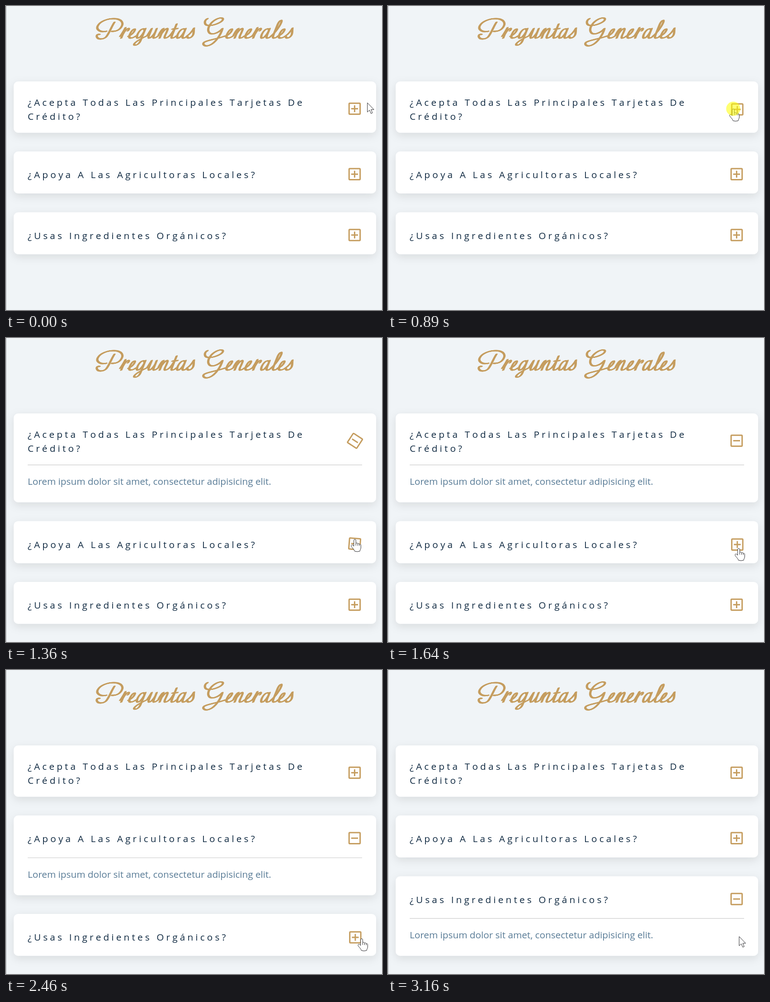
Animation of 832x673 px, one loop 3.35 s. Source, as an HTML page:

```html
<!DOCTYPE html>
<html lang="es">
<head>
<meta charset="utf-8">
<title>Preguntas Generales</title>
<style>
  html, body { margin: 0; width: 100%; height: 100%; overflow: hidden; background: #f0f4f7; }
  svg { display: block; width: 832px; height: 673px; }
  text { font-family: "Open Sans", "Noto Sans", sans-serif; font-size: 20.73px; }
  .ask { fill: #102a42; letter-spacing: 5.17px; font-kerning: none; }
  .answer { fill: #587b96; }
  .rule { stroke: #d3d3d3; stroke-width: 1.4; }
  .icon { fill: none; stroke: #c59d5f; stroke-width: 3; }
  .script { fill: none; stroke: #c59d5f; stroke-width: 2.4; stroke-linecap: round; stroke-linejoin: round; }
  .cursor { fill: #fff; stroke: #2a2a2e; stroke-width: 1; stroke-linejoin: round; }
</style>
</head>
<body>
<svg viewBox="0 0 832 673">
  <defs>
    <filter id="shade" filterUnits="userSpaceOnUse" x="-40" y="-40" width="920" height="320">
      <feDropShadow dx="0" dy="6" stdDeviation="9.5" flood-color="#000" flood-opacity=".1"/>
    </filter>
  </defs>
  <rect width="832" height="673" fill="#f0f4f7"/>
  <rect width="1" height="673" fill="#b9bdc1"/>
  <g id="heading" role="img" aria-label="Preguntas Generales"></g>
  <g id="cards"></g>
  <g id="pointer">
    <path id="arrow" class="cursor" d="M0 0V20.5L4.7 16.2 8 23.7 11.2 22.3 8 15H14.4Z"/>
    <path id="hand" class="cursor" d="M-2.3 15V2.2a2.3 2.3 0 0 1 4.6 0V8.5c1-1.1 4-.9 4.2 1c1-.9 3.6-.5 3.8 1.3c1.2-.7 3 .1 3 2V18c0 3.2-1.8 4.4-2.4 8Q5 28-.6 26C-1.4 22-5 20-7.7 15.6C-9 13-6.4 11-4.4 12.6ZM2.3 8.5v5M6.5 9.5v4.3M10.3 10.8v3.4"/>
  </g>
  <circle id="glow" r="15.7" fill="#ffff00"/>
</svg>
<script>
const LOOP = 3350, LIFT = 83.4, TURN = 300, GLOW = .55;
const $ = id => document.getElementById(id);

// Handwritten heading: upright letters on a baseline, slanted and drawn with a broad nib.
const letters = {
  r: [18, 'M0-4C2-10 3-16 4-23V0M4-7C5-15 8-22 12-21C14-20 13-17 12-16'],
  e: [17, 'M0-4C5-6 9-11 9-17C9-22 3-21 2-11C1-4 3 0 7 0C11 0 14-2 17-5'],
  g: [24, 'M13-18C12-22 4-22 2-11C1-4 3 0 6 0C10 0 13-8 14-15M14-21V6C14 14 8 17 4 15C0 12 8 4 24-5'],
  u: [25, 'M0-5C2-12 3-18 4-21V-7C4-2 5 0 7 0C11 0 14-8 15-14M15-21V-6C15-1 16 0 18 0C21 0 23-3 25-5'],
  n: [25, 'M0-7C1-16 3-21 5-21V0M5-9C7-16 11-22 13-21C16-20 15-15 15-10C14-3 15 0 18 0C21 0 23-3 25-5'],
  t: [15, 'M0-5C2-9 4-16 5-22M5-31V-6C5-1 6 0 8 0C11 0 14-3 15-5M0-20L11-21'],
  a: [24, 'M14-18C12-22 4-22 2-11C1-4 3 0 6 0C10 0 13-8 14-15M14-21V-6C14-1 16 0 18 0C21 0 23-3 24-5'],
  l: [15, 'M0-5C6-12 11-28 10-36C9-42 4-39 4-30V-7C4-1 6 0 8 0C12 0 14-3 15-5'],
  s: [17, 'M0-5C4-9 7-16 8-22C9-16 13-11 12-6C11 0 4 2 1-3']
};
const bigP = 'M240 36C233 46 228 62 221 69C215 74 203 75 201 68C200 64 203 62 207 63' +
             'M222 56C208 59 199 52 203 44C208 34 224 28 238 28C254 28 261 36 256 45C252 53 243 57 234 56';
const bigG = 'M446 28C438 32 438 42 447 43C460 44 478 36 480 30C481 26 474 25 466 29' +
             'C452 36 444 50 449 58C454 66 470 60 479 50C476 62 464 82 450 87C442 90 435 87 437 82C440 76 465 74 486 66';

function write(word, x) {
  return [...word].map(c => {
    const [width, d] = letters[c];
    const glyph = `<path transform="translate(${x} 71) skewX(-22)" d="${d}"/>`;
    x += width;
    return glyph;
  }).join('');
}
const ink = `<path d="${bigP}${bigG}"/>` + write('reguntas', 251) + write('enerales', 484);
$('heading').innerHTML = [-1.4, -.7, 0, .7, 1.4]
  .map(o => `<g class="script" transform="translate(${o} ${-o * .25})">${ink}</g>`).join('');

// Cards: all y values are relative to the card top.
const cards = [
  { top: 167, height: 113.4, icon: 60.4, hover: [180, 1250],
    lines: [[54, '¿Acepta Todas Las Principales Tarjetas De'], [85, 'Crédito?']] },
  { top: 322, height: 93, icon: 50.3, hover: [1340, 1937],
    lines: [[59.2, '¿Apoya A Las Agricultoras Locales?']] },
  { top: 456.7, height: 92.7, icon: 50.3, hover: [2140, 2860],
    lines: [[59.2, '¿Usas Ingredientes Orgánicos?']] }
];
$('cards').innerHTML = cards.map(c => `<g>
  <rect x="17" width="802" rx="10" fill="#fff" filter="url(#shade)"/>
  ${c.lines.map(([y, s]) => `<text class="ask" x="48" y="${y}">${s}</text>`).join('')}
  <g class="more">
    <path class="rule" d="M48 ${c.height + .6}H788"/>
    <text class="answer" x="48" y="${c.height + 44.8}">Lorem ipsum dolor sit amet, consectetur adipisicing elit.</text>
  </g>
  <g class="icon">
    <rect x="759.2" y="${c.icon - 12.2}" width="24.4" height="24.4" rx="1.5"/>
    <path d="M763.8 ${c.icon}h15.2"/>
    <path class="bar" d="M771.4 ${c.icon - 7.6}v15.2"/>
  </g></g>`).join('');
cards.forEach((c, i) => {
  c.node = $('cards').children[i];
  const find = s => c.node.querySelector(s);
  Object.assign(c, { box: find('rect'), more: find('.more'), mark: find('.icon'), bar: find('.bar') });
});

// Pointer track: time, x, y
const track = [
  [0, 799.7, 214.3], [70, 797, 216], [140, 790, 220], [210, 778, 224], [280, 766, 227],
  [340, 758, 228], [410, 760, 228], [480, 764, 228], [1150, 764, 228], [1220, 765, 238],
  [1290, 768, 325], [1360, 772, 446], [1430, 774, 461], [1640, 776, 466], [1900, 776, 466],
  [1970, 776, 482], [2040, 777, 508], [2110, 778, 552], [2180, 781, 582], [2390, 786, 595],
  [2460, 787, 595], [2594, 781, 592], [2728, 777, 590], [3350, 777, 590]
];
// Screen updates: first, last, count
const bursts = [[70, 480, 7], [680, 960, 5], [1220, 1640, 7], [1900, 2390, 8], [2460, 2930, 8], [3000, 3160, 3]];

function hold(t) {
  let held = 0;
  for (const [a, b, n] of bursts) {
    const step = (b - a) / (n - 1);
    if (t >= a) held = a + Math.min(n - 1, Math.floor((t - a) / step + .01)) * step;
  }
  return held;
}

// The CSS "ease" curve, solved by bisection.
function ease(x) {
  if (x <= 0) return 0;
  if (x >= 1) return 1;
  const curve = (p, q, u) => 3 * p * u * (1 - u) ** 2 + 3 * q * u * u * (1 - u) + u ** 3;
  let lo = 0, hi = 1;
  for (let i = 0; i < 24; i++) {
    const mid = (lo + hi) / 2;
    if (curve(.25, .25, mid) < x) lo = mid; else hi = mid;
  }
  return curve(.1, 1, lo);
}

function place(t) {
  const i = Math.max(1, track.findIndex(k => k[0] >= t));
  const [t0, x0, y0] = track[i - 1], [t1, x1, y1] = track[i];
  const f = (t - t0) / (t1 - t0);
  return [x0 + (x1 - x0) * f, y0 + (y1 - y0) * f];
}

const show = (node, on) => node.style.display = on ? '' : 'none';

function draw(time) {
  const t = hold(time);
  const open = t >= 2860 ? 2 : t >= 1970 ? 1 : t >= 960 ? 0 : -1;
  let over = false;
  cards.forEach((c, i) => {
    const [a, b] = c.hover, active = i === open;
    const angle = 90 * (ease((t - a) / TURN) - ease((t - b) / TURN));
    const top = c.top + (open >= 0 && open < i ? LIFT : 0);
    c.node.setAttribute('transform', `translate(0 ${top})`);
    c.box.setAttribute('height', c.height + (active ? LIFT : 0));
    c.mark.setAttribute('transform', `rotate(${angle} 771.4 ${c.icon + 1.5})`);
    show(c.more, active);
    show(c.bar, !active);
    over = over || (t >= a && t < b);
  });

  const [x, y] = place(t);
  $('pointer').setAttribute('transform', `translate(${x} ${y})`);
  show($('hand'), over);
  show($('arrow'), !over);

  let glow = 0;
  if (t >= 680 && t < 960) glow = Math.min(GLOW, (t - 640) / 150);
  if ((t >= 1900 && t < 1970) || (t >= 2790 && t < 2860)) glow = GLOW;
  $('glow').setAttribute('cx', x);
  $('glow').setAttribute('cy', y - .5);
  $('glow').setAttribute('opacity', glow);
}

const start = performance.now();
function tick() {
  draw((performance.now() - start) % LOOP);
  requestAnimationFrame(tick);
}
tick();
</script>
</body>
</html>
```
